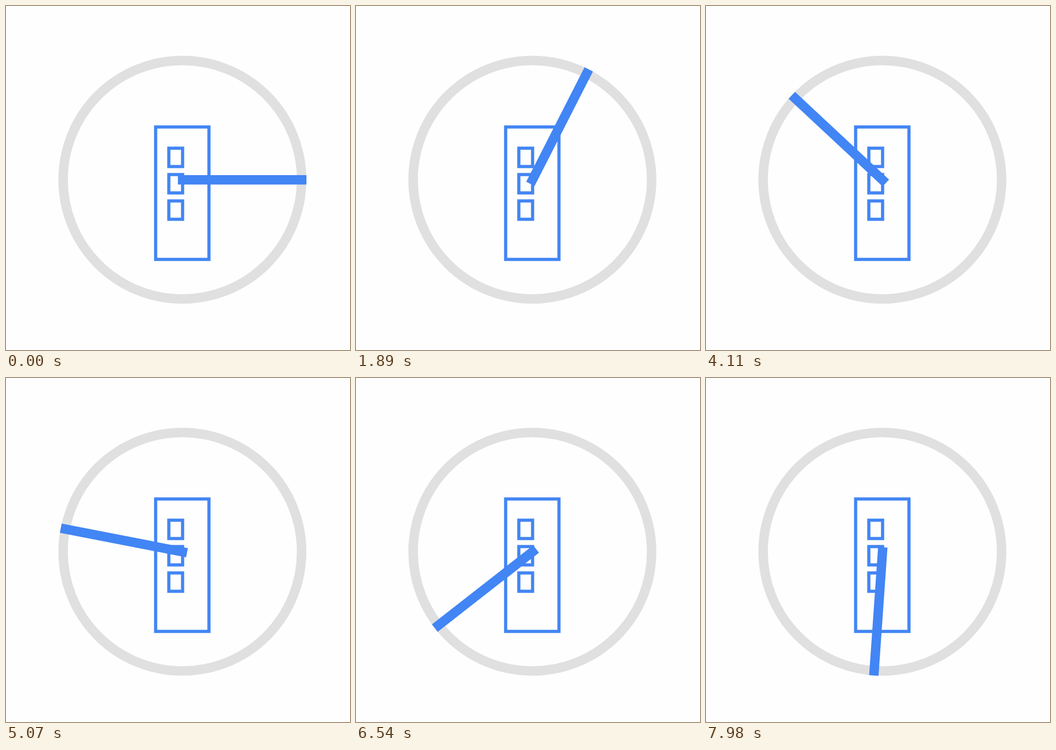
Recreate the animation shown at these times as an HTML page. Size 600 by 600 pixels, loop 8 s.

```html
<!DOCTYPE html>
<html lang="en">
<head>
<meta charset="utf-8">
<title>Dial</title>
<style>
  html, body { margin: 0; width: 100%; height: 100%; overflow: hidden; background: #fefefe; }
  svg { display: block; width: 100%; height: 100%; }
</style>
</head>
<body>
<svg viewBox="0 0 600 600" fill="none">
  <circle cx="307.6" cy="303" r="208" stroke="#e0e0e0" stroke-width="16.5"/>
  <g stroke="#4285f4" stroke-width="5.5">
    <rect x="261" y="211" width="93" height="231"/>
    <rect x="284" y="248" width="24" height="32"/>
    <rect x="284" y="294" width="24" height="32"/>
    <rect x="284" y="340" width="24" height="32"/>
  </g>
  <rect id="hand" x="-8" y="-8.2" width="224.2" height="16.4" fill="#4285f4"/>
</svg>
<script>
  const LOOP = 8000;
  const STEP = 30; // one degree per step
  const hand = document.getElementById('hand');
  const start = performance.now();

  function draw(t) {
    const deg = Math.floor(t / STEP);
    hand.setAttribute('transform', `translate(307.8 303.2) rotate(${-deg})`);
  }

  function tick() {
    draw((performance.now() - start) % LOOP);
    requestAnimationFrame(tick);
  }

  draw(0);
  requestAnimationFrame(tick);
</script>
</body>
</html>
```
